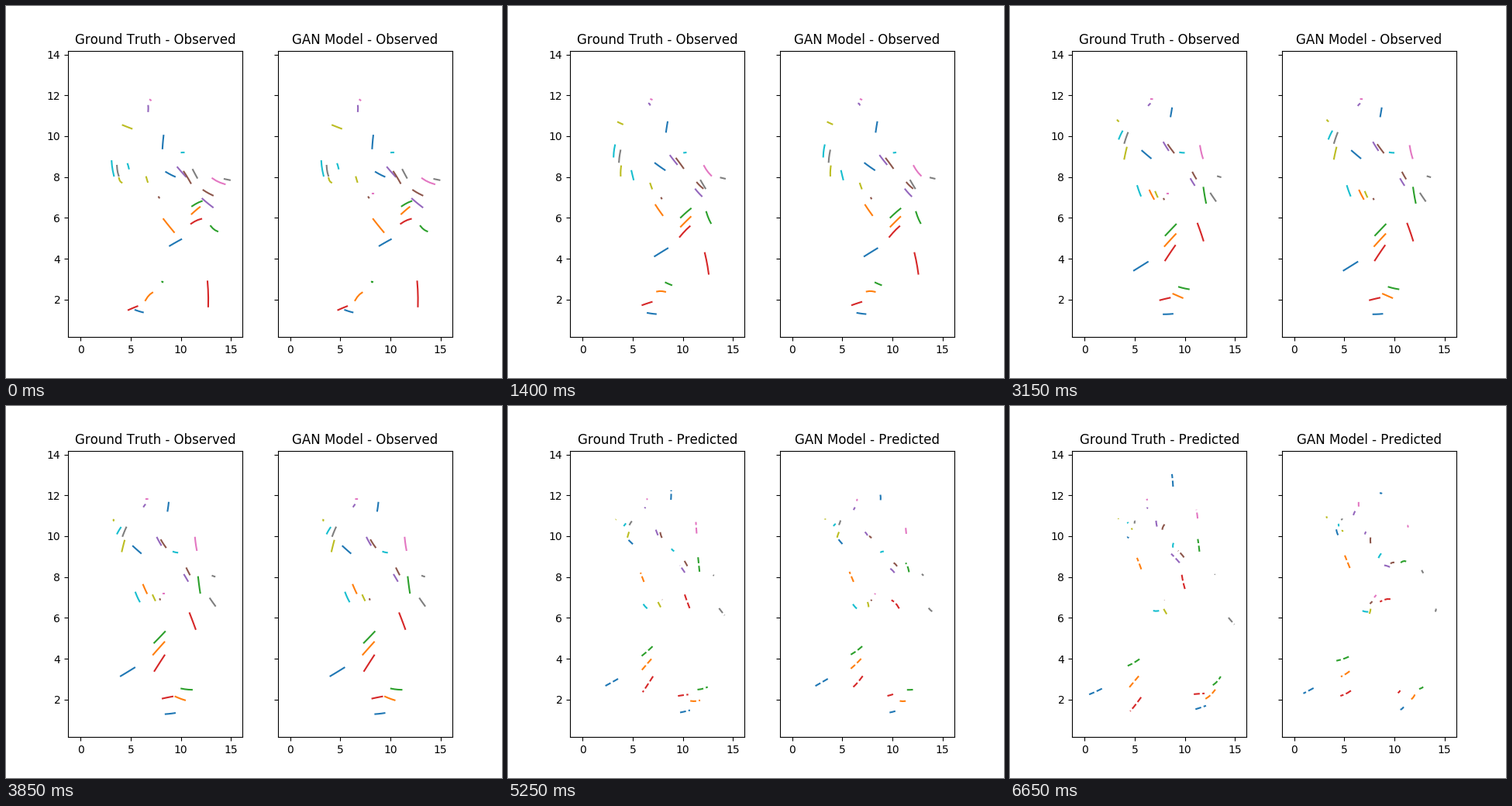
Animation, 640 px wide and 480 px high, one loop 7 s. Source, as a matplotlib script:

```python
import numpy as np
import matplotlib.pyplot as plt
from matplotlib.animation import FuncAnimation

FRAMES = 20
INTERVAL = 350
LAST_SEEN = 11         # last observed time step
TAIL = 3               # time steps shown behind each walker
STEPS = np.arange(-TAIL, FRAMES)

plt.rcParams["text.kerning_factor"] = 6
fig, axes = plt.subplots(1, 2, sharey=True, figsize=(6.4, 4.8), dpi=100)
for ax in axes:
    ax.set_xlim(-1.264, 16.186)
    ax.set_ylim(0.163, 14.189)

walkers = []


def curve(points):
    """Polynomial from start to end, by way of the last observed place."""
    times = [-TAIL, 4, LAST_SEEN, FRAMES - 1][-len(points):]
    times[0] = -TAIL
    degree = len(points) - 1
    return np.vander(STEPS, degree + 1) @ np.polyfit(times, points, degree)


def bend(path, goal):
    """Keep the observed path, then leave it at its own speed for the goal."""
    last = LAST_SEEN + TAIL
    speed = path[last] - path[last - 1]
    span = FRAMES - 1 - LAST_SEEN
    s = np.arange(1, span + 1)[:, None]
    miss = goal - path[last] - span * speed
    return np.vstack([path[:last + 1],
                      path[last] + speed * s + miss * (s / span) ** 2])


def walk(color, *points, guess):
    """Points: start, optional midway, last observed, end; guess: model's end."""
    path = curve(points)
    for ax, p in zip(axes, (path, bend(path, guess))):
        line, = ax.plot([], [], color=f"C{color}", lw=1.5)
        walkers.append((line, p))


# blue
walk(0, (10.05, 4.95), (7.2, 4.12), (4, 3.15), (.45, 2.25), guess=(.9, 2.3))
walk(0, (8.17, 9.4), (8.48, 10.69), (8.79, 11.64), (8.72, 13.04), guess=(8.53, 12.1))
walk(0, (9.41, 8.02), (7.24, 8.68), (5.23, 9.51), (4.3, 9.97), guess=(4.18, 10.38))
walk(0, (5.46, 1.49), (9.41, 1.34), (12.12, 1.7), guess=(10.92, 1.64))
# orange
walk(1, (9.33, 5.3), (7.28, 6.63), (6.24, 7.62), (5.23, 8.94), guess=(5.04, 9.06))
walk(1, (6.47, 1.96), (8.25, 2.38), (10.42, 1.97), (13.05, 2.49), guess=(12.1, 2.32))
walk(1, (11.9, 6.53), (9.8, 5.57), (7.24, 4.2), (4.38, 2.55), guess=(4.65, 3.12))
# green
walk(2, (8.17, 2.87), (8.87, 2.71), (11.11, 2.48), (13.59, 3.13), guess=(12.87, 2.62))
walk(2, (12.1, 6.82), (9.8, 6.02), (7.35, 4.78), (4.3, 3.65), guess=(4.2, 3.9))
walk(2, (13.67, 5.34), (12.35, 6.29), (11.73, 8), (11.3, 9.86), guess=(10.6, 8.7))
# red
walk(3, (4.77, 1.49), (9.18, 2.15), (11.97, 2.3), guess=(10.55, 2.45))
walk(3, (12.74, 1.66), (12.2, 4.28), (10.88, 6.23), (9.7, 8.11), guess=(8.55, 6.79))
walk(3, (12.05, 5.95), (9.7, 5.07), (7.37, 3.4), (4.55, 1.43), guess=(4.6, 2.18))
# purple
walk(4, (6.74, 11.22), (6.62, 11.6), (6.3, 11.45), (6.3, 11.41), guess=(5.89, 11.03))
walk(4, (10.5, 8.02), (7.63, 9.93), (7.13, 10.76), guess=(7.05, 10.09))
walk(4, (13.2, 6.52), (11.27, 7.4), (10.34, 8.11), (8.64, 9.14), guess=(8.91, 8.58))
# brown
walk(5, (11, 7.7), (9.35, 8.91), (8.03, 9.81), (7.98, 10.58), guess=(7.62, 9.6))
walk(5, (13.2, 7.1), (11.42, 7.73), (10.57, 8.43), (9.33, 9.29), guess=(9.6, 8.66))
walk(5, (7.8, 7.02), (7.93, 6.9), (7.93, 6.87), guess=(7.55, 6.69))
# pink
walk(6, (7, 11.76), (6.55, 11.82), (6.15, 11.78), guess=(6.43, 11.45))
walk(6, (14.4, 7.65), (12.12, 8.55), (11.42, 9.93), (11.15, 11.3), guess=(11.37, 10.43))
walk(6, (8.25, 7.2), (8.3, 7.2), (8.3, 7.2), guess=(7.98, 7))
# gray
walk(7, (11.2, 8.36), (13.44, 6.59), (14.95, 5.68), guess=(14.15, 6.45))
walk(7, (14.9, 7.85), (13.17, 8.06), (13.05, 8.13), guess=(12.72, 8.34))
walk(7, (3.8, 8.06), (3.78, 9.3), (4.55, 10.43), (4.97, 10.62), guess=(4.67, 10.8))
# olive
walk(8, (5.1, 10.37), (3.53, 10.69), (3.28, 10.8), (3.32, 10.86), guess=(3.2, 10.97))
walk(8, (4.1, 7.73), (3.84, 8.53), (4.38, 9.78), (4.69, 10.33), guess=(4.85, 10.22))
walk(8, (6.55, 8), (7.44, 6.86), (8.2, 6.18), guess=(7.5, 6.2))
# cyan
walk(9, (3.32, 8.06), (3.23, 9.56), (4, 10.42), (4.24, 10.64), guess=(4.43, 10.48))
walk(9, (4.69, 8.64), (5.08, 7.88), (5.89, 6.8), (7.6, 6.38), guess=(7.5, 6.3))
walk(9, (10.08, 9.2), (10.13, 9.19), (9.26, 9.24), (8.87, 9.67), guess=(8.4, 8.93))


def draw(frame):
    seen = frame <= LAST_SEEN
    for ax, name in zip(axes, ("Ground Truth", "GAN Model")):
        ax.set_title(f"{name} - {'Observed' if seen else 'Predicted'}")
    for line, path in walkers:
        line.set_data(*path[frame:frame + TAIL + 1].T)
        line.set_linestyle("-" if seen else "--")
    return []


anim = FuncAnimation(fig, draw, frames=FRAMES, interval=INTERVAL, repeat=True)
plt.show()
```
